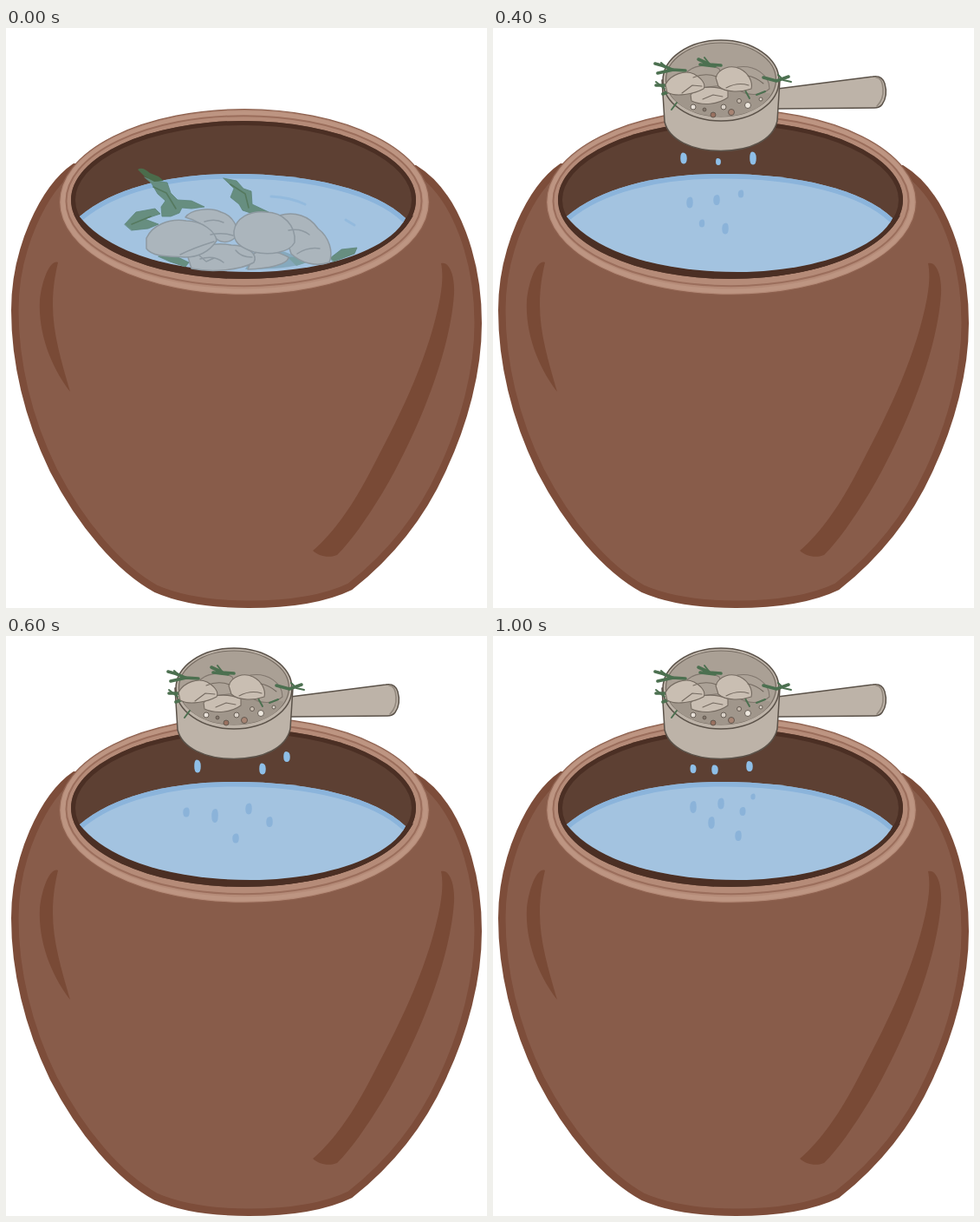
An HTML page that plays this animation: 555x668 px, repeating every 1.2 s.

```html
<!DOCTYPE html>
<html lang="en">
<head>
<meta charset="utf-8">
<title>Rinsing in the pot</title>
<style>
  html, body { margin: 0; width: 100%; height: 100%; overflow: hidden; background: #fff; }
  svg { display: block; width: 100%; height: 100%; }
  path, ellipse { stroke-linecap: round; stroke-linejoin: round; }
  .clump path { fill: #abb5bc; stroke: #8e99a1; stroke-width: 1.5; }
  .clump .crease, .food .crease { fill: none; }
  .wet path { fill: #678e80; stroke: #5c8478; stroke-width: .8; }
  .food path { fill: #c9beb2; stroke: #756b61; stroke-width: 1.1; }
  .food .back { fill: #aca297; stroke: #81776e; }
  .herb path { fill: none; stroke: #4c7050; stroke-width: 3.6; }
  .herb .thin { stroke-width: 2; }
  .metal path { fill: #bdb3a8; stroke: #5b5249; stroke-width: 1.5; }
</style>
</head>
<body>
<svg viewBox="0 0 555 668" preserveAspectRatio="none">
  <defs>
    <path id="pot" d="M78 157C40 183 7 255 7 325C7 385 22 450 52 511C84 573 128 625 172 649C202 662 238 667 280 667C326 667 368 661 399 646C442 612 480 568 506 511C532 456 548 395 548 340C548 270 524 190 473 159Z"/>
    <clipPath id="mouth"><ellipse cx="274" cy="198" rx="199" ry="91"/></clipPath>
    <path id="water" d="M85 217C124 184 190 168 264 168C352 168 426 186 461 219C444 255 366 281 283 281C193 281 116 258 85 217Z"/>
    <clipPath id="potClip"><use href="#pot"/></clipPath>
    <clipPath id="waterClip"><use href="#water"/></clipPath>
  </defs>

  <g id="jar">
    <use href="#pot" fill="#885c4a" stroke="#7d4d3a" stroke-width="2"/>
    <use href="#pot" fill="none" stroke="#7d4d3a" stroke-width="15" clip-path="url(#potClip)"/>
    <path fill="#794a36" d="M60 270C52 266 42 287 39 313C37 350 51 389 74 419C64 384 54 352 54 319C54 298 57 283 60 270Z"/>
    <path fill="#794a36" d="M502 271C511 268 518 284 517 306C513 370 478 462 434 536C415 567 398 591 382 607C371 611 361 608 354 602C380 580 402 547 425 502C458 440 489 375 501 310C504 292 504 281 502 271Z"/>

    <ellipse cx="275" cy="200.5" rx="213.5" ry="106.8" fill="#b58b78" stroke="#8d604e" stroke-width="1.3"/>
    <ellipse cx="275" cy="200.5" rx="209" ry="102.5" fill="none" stroke="#bd9582" stroke-width="5"/>
    <ellipse cx="274.5" cy="199.2" rx="205" ry="98" fill="none" stroke="#9b6e5c" stroke-width="2"/>
    <ellipse cx="274" cy="198" rx="199" ry="91" fill="#5d4033"/>
    <ellipse cx="274" cy="198" rx="199" ry="91" fill="none" stroke="#4b2f24" stroke-width="10" clip-path="url(#mouth)"/>
    <path fill="#4b2f24" d="M79 216C111 260 193 289 282 288C375 288 447 258 470 216L461 219C444 255 366 281 283 281C193 281 116 258 85 217Z"/>
    <use href="#water" fill="#a3c3e0"/>
    <path d="M85 217C124 184 190 168 264 168C352 168 426 186 461 219" fill="none" stroke="#8bb4db" stroke-width="11" clip-path="url(#waterClip)"/>
  </g>

  <g id="soak">
    <g class="wet">
      <path d="M160 172L172 176L186 178L190 190L198 198L214 199L229 206L214 208L203 207L200 213L190 217L180 217L179 206L184 199L175 191L168 179Z"/>
      <path d="M137 226L150 212L172 208L178 214L160 220L176 226L164 231L145 233Z"/>
      <path d="M251 173L266 176L274 185L283 188L284 203L303 212L285 214L273 210L269 203L259 195L263 185Z"/>
      <path d="M374 265L387 255L405 253L402 260L378 269Z"/>
      <path d="M176 263L190 260L211 270L207 275L189 269Z"/>
    </g>
    <path fill="#4b6c4b" d="M152 163Q157 159 166 167L176 171L182 176L171 177L160 171Z"/>
    <path fill="none" stroke="#55795f" stroke-width="1.6" d="M170 183L185 190L196 208M259 180L276 191L280 207M145 226L167 217"/>
    <path fill="#86a9bd" d="M286 259Q310 249 340 266L344 271Q325 278 276 278Z"/>
    <path fill="#7aa1a5" d="M325 264L343 263L350 269L335 274Z"/>
    <g class="clump">
      <path d="M207 218C213 209 235 206 248 212C262 216 270 231 265 241C256 249 246 248 239 239C230 227 219 221 207 218Z"/>
      <path d="M315 216C333 211 350 216 360 231C373 241 378 258 373 270C357 275 341 271 329 260Z"/>
      <path d="M286 260C298 253 315 258 326 264C325 273 301 277 279 278Z"/>
      <path d="M210 264C221 252 239 246 260 250C279 250 291 261 286 270C270 279 238 282 214 277Z"/>
      <path d="M162 242C169 227 188 219 208 222C227 222 242 235 243 245C235 257 224 264 206 264C190 263 169 264 162 254Z"/>
      <path d="M263 234C265 219 281 210 300 212C320 212 335 228 333 247C327 259 304 262 286 258C270 253 262 246 263 234Z"/>
      <path class="crease" d="M201 261Q217 253 240 246M229 223Q241 219 251 224M236 238Q250 235 262 239M326 233Q340 230 350 238M336 260Q348 252 362 254M224 266Q240 261 251 270M265 256Q271 264 284 264M223 262L231 269L240 265"/>
    </g>
    <path fill="none" stroke="#93badd" stroke-width="3" d="M306 194Q328 195 345 203M392 221L402 227"/>
  </g>

  <g id="scoop">
    <g class="metal">
      <path d="M328 70L438 56Q449 54 452 64Q456 78 449 88Q446 92 440 92L328 93Z"/>
      <path d="M195 60L198 108C203 129 230 141.5 263 141.5C297 141.5 323 129 328 107L331 60Z"/>
    </g>
    <path fill="none" stroke="#91877c" stroke-width="1.6" d="M442 57Q449 57 450 70Q451 82 443 90"/>
    <ellipse cx="263" cy="60.5" rx="67" ry="46.5" fill="#bdb3a8" stroke="#5b5249" stroke-width="1.5"/>
    <ellipse cx="263" cy="59.5" rx="63.5" ry="42.5" fill="#aaa095" stroke="#756b61" stroke-width="1.2"/>
    <path fill="#a0968b" d="M205 77C220 71 304 71 321 76C311 94 287 102 263 102C237 102 216 93 205 77Z"/>
    <g class="food">
      <path class="back" d="M222 53C229 43 249 40 261 47L267 66L236 69Z"/>
      <path class="back" d="M282 45C302 42 319 54 319 70C309 79 293 78 283 71Z"/>
    </g>
    <g class="herb">
      <path d="M187 41Q197 43 207 48L222 49M190 52L208 48M188 66L203 66M196 76L208 71"/>
      <path d="M237 36L250 42L263 43M239 42L256 44M312 57L327 61L341 56"/>
      <path class="thin" d="M194 40L204 49M188 62L198 70M244 34L251 43M329 54L335 60L344 62M304 77L314 73M206 94L212 86M291 72L296 81"/>
    </g>
    <g class="food">
      <path d="M228 77C235 68 252 65 271 72L271 80C260 88 242 90 229 84Z"/>
      <path d="M199 65C205 53 222 48 232 53C241 58 246 65 243 70C232 76 211 80 201 74Z"/>
      <path d="M257 57C261 46 274 42 285 47C295 52 300 62 298 70C287 74 269 75 260 67Z"/>
      <path class="crease" d="M218 75L230 66L241 67M242 82L254 77L265 79M269 69Q282 62 295 66M231 57Q245 51 258 56M294 55Q304 57 312 64"/>
    </g>
    <g id="bits" stroke="#5d544b" stroke-width=".9"></g>
  </g>
  <g id="drops"></g>
</svg>

<script>
  const LOOP = 1200, STEP = 200;
  const NS = "http://www.w3.org/2000/svg";
  const byId = id => document.getElementById(id);

  function add(parent, tag, attrs = {}) {
    const el = document.createElementNS(NS, tag);
    for (const key in attrs) el.setAttribute(key, attrs[key]);
    return parent.appendChild(el);
  }

  // One 0/1 digit per step
  function show(el, steps) {
    const keys = [...steps, steps[steps.length - 1]].map((on, i) => ({
      opacity: +on, offset: i * STEP / LOOP, easing: "steps(1, end)"
    }));
    const anim = el.animate(keys, { duration: LOOP, iterations: Infinity });
    anim.startTime = 0;
  }

  const pebbles = [
    [231, 91, 3, "#e8e1d9"], [254, 100, 3, "#98705f"], [266, 91, 3, "#d9d1c8"],
    [275, 97, 3.5, "#a78473"], [294, 89, 3.5, "#eee8df"], [309, 82, 2, "#ddd5cc"],
    [244, 94, 2, "#82766b"], [284, 84, 2.5, "#c9beb2"]
  ];
  for (const [cx, cy, r, fill] of pebbles) add(byId("bits"), "circle", { cx, cy, r, fill });

  // Each drop: x, y, height
  const patterns = [
    { steps: "010011",
      air: [[231, 153, 10], [256, 154, 11], [296, 150, 12]],
      pool: [[231, 197, 14], [263, 193, 13], [300, 185, 7], [288, 202, 10], [252, 215, 14], [283, 230, 12]] },
    { steps: "001000",
      air: [[220, 150, 13], [260, 154, 8], [300, 150, 15]],
      pool: [[227, 201, 13], [258, 198, 12], [286, 191, 9], [241, 225, 9], [268, 231, 13]] },
    { steps: "000100",
      air: [[221, 150, 15], [296, 153, 13], [324, 139, 12]],
      pool: [[208, 203, 11], [241, 207, 16], [280, 199, 13], [304, 214, 12], [265, 233, 11]] }
  ];

  function drop(group, [x, y, h], fill, lean) {
    const w = Math.min(7.5, h * .55 + 1.5), top = y - h / 2, end = y + h / 2;
    const d = `M${x + lean} ${top}Q${x + w / 2} ${top} ${x + w / 2} ${y}` +
      `Q${x + w / 2} ${end} ${x} ${end}Q${x - w / 2} ${end} ${x - w / 2} ${y}` +
      `Q${x - w / 2} ${top} ${x + lean} ${top}Z`;
    add(group, "path", { d, fill });
  }

  for (const { steps, air, pool } of patterns) {
    const group = add(byId("drops"), "g");
    air.forEach(p => drop(group, p, "#8ebfe8", -1));
    pool.forEach(p => drop(group, p, "#8bb3d9", 1));
    show(group, steps);
  }
  show(byId("soak"), "100000");
  show(byId("scoop"), "011111");
</script>
</body>
</html>
```
